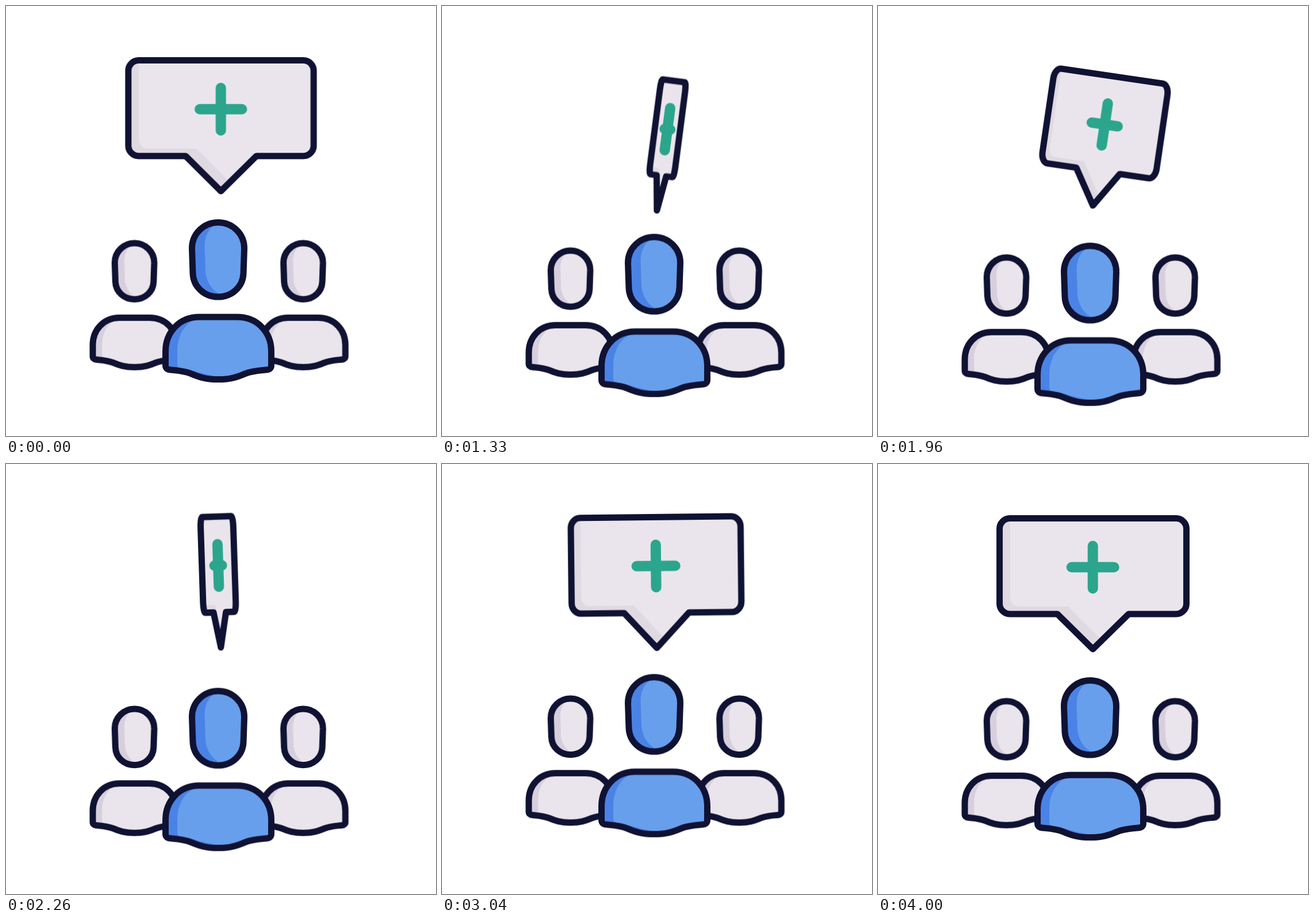
An HTML page without scripts for the animation above (4120 ms loop, 748 by 748 pixels).

```html
<!DOCTYPE html>
<html lang="en">
<head>
<meta charset="utf-8">
<title>Team message</title>
<style>
  html, body { margin: 0; width: 100%; height: 100%; overflow: hidden; background: #fff; }
  svg { display: block; width: 100%; height: 100%; }

  path { vector-effect: non-scaling-stroke; }
  .line { fill: none; stroke: #101233; stroke-width: 11; stroke-linejoin: round; }
  .plus { fill: none; stroke: #2ca58d; stroke-width: 18; stroke-linecap: round; }
  .pale { --light: #eae5ec; --shade: #d7cfdd; }
  .blue { --light: #679fec; --shade: #4a83e6; }
  .bubble { --light: #eae5ec; --shade: #dfd9e2; }
  .light { fill: var(--light); }
  .shade { fill: var(--shade); }

  .lead, .side, .lift, .tilt, .turn {
    animation: 4.12s cubic-bezier(.37, 0, .63, 1) infinite;
    transform-origin: 373.8px 322px;
  }
  .lead { animation-name: lead; }
  .side { animation-name: side; }
  .lift { animation-name: lift; }
  .tilt { animation-name: tilt; }
  .turn { animation-name: turn; animation-timing-function: linear; }

  @keyframes lead {
    0%, 24.6% { transform: translateY(0); }
    38.9% { transform: translateY(45px); }
    42.6% { transform: translateY(46px); }
    67.9% { transform: translateY(-12px); }
    80% { transform: translateY(1px); }
    91%, 100% { transform: translateY(0); }
  }
  @keyframes side {
    0%, 24.6% { transform: translateY(0); }
    39.4% { transform: translateY(24.3px); }
    45.2% { transform: translateY(25.8px); }
    68% { transform: translateY(-6.5px); }
    84% { transform: translateY(.5px); }
    93%, 100% { transform: translateY(0); }
  }
  @keyframes lift {
    0%, 24.4% { transform: translateY(0); }
    37.5% { transform: translateY(51px); }
    59.8% { transform: translateY(-10px); }
    80%, 100% { transform: translateY(0); }
  }
  @keyframes tilt {
    0%, 24.7% { transform: rotate(0); }
    39.5% { transform: rotate(14.2deg); }
    62.4% { transform: rotate(-7deg); }
    81.8% { transform: rotate(3deg); }
    97%, 100% { transform: rotate(0); }
  }
  /* the bubble spins once: fast half turn, then a slow one */
  @keyframes turn {
    0%, 24.6% { transform: scaleX(.992); animation-timing-function: cubic-bezier(.12, 0, .39, 0); }
    31.8% { transform: scaleX(0); animation-timing-function: cubic-bezier(.61, 1, .88, 1); }
    37.8% { transform: scaleX(1); animation-timing-function: cubic-bezier(.3, 0, .7, .8); }
    40.6% { transform: scaleX(.855); }
    47.9% { transform: scaleX(.607); }
    57.7% { transform: scaleX(0); }
    62.4% { transform: scaleX(.316); }
    68% { transform: scaleX(.68); }
    74.1% { transform: scaleX(.92); animation-timing-function: cubic-bezier(.2, .5, .6, 1); }
    92%, 100% { transform: scaleX(1); }
  }
</style>
</head>
<body>
<svg viewBox="0 0 748 748">
  <defs>
    <path id="headLine" d="M0 0C25 0 45.8 20 45.5 45.5L44 89C43 112 24 129.5 0 129.5S-43 112 -44 89L-45.5 45.5C-45.8 20 -25 0 0 0Z"/>
    <path id="bodyLine" d="M-33 0H33C69 0 92.5 27 92.5 60V84Q92.5 91 85 91.7C71 93 59 93.5 47 98.5C33 104.5 21 108.5 0 108.5S-33 104.5 -47 98.5C-59 93.5 -71 93 -84 91.7Q-91.5 91 -91.5 84V60C-91.5 27 -68 0 -33 0Z"/>
    <path id="bubbleLine" d="M229.5 94.5H518.5A18 18 0 0 1 536.5 112.5V243A18 18 0 0 1 518.5 261H436L373.8 322L312 261H229.5A18 18 0 0 1 211.5 243V112.5A18 18 0 0 1 229.5 94.5Z"/>

    <g id="head">
      <use href="#headLine" class="shade"/>
      <path class="light" d="M4 1C-13 4 -23.5 20 -23.5 42L-22 86C-20 105 -9 121 10 128C30 124 43 110 44 89L45.5 45.5C45.8 20 25 0 4 1Z"/>
      <use href="#headLine" class="line"/>
    </g>
    <g id="body">
      <use href="#bodyLine" class="shade"/>
      <path class="light" d="M-25 0C-55 4 -71 29 -71 60V81Q-71 89 -63 90C-43 91 -28 100 3 104C26 104 36 99 47 98.5C59 93.5 71 93 85 91.7Q92.5 91 92.5 84V60C92.5 27 69 0 33 0Z"/>
      <use href="#bodyLine" class="line"/>
    </g>
    <g id="mate">
      <use href="#head" transform="translate(0 412.5) scale(.755)"/>
      <use href="#body" transform="translate(0 542.3) scale(.793)"/>
    </g>
  </defs>

  <g class="side pale">
    <use href="#mate" x="223.5"/>
    <use href="#mate" x="517"/>
  </g>
  <g class="lead blue">
    <use href="#head" x="369" y="376.5"/>
    <use href="#body" x="369" y="541.1"/>
  </g>

  <g class="lift"><g class="tilt"><g class="turn bubble">
    <use href="#bubbleLine" class="shade"/>
    <path class="light" d="M230 94.5V231Q230 248 247 248H331L388 305L436 261H518.5A18 18 0 0 0 536.5 243V112.5A18 18 0 0 0 518.5 94.5Z"/>
    <use href="#bubbleLine" class="line"/>
    <path class="plus" d="M373.7 142.5V216.5M336.7 179.5H410.7"/>
  </g></g></g>
</svg>
</body>
</html>
```
